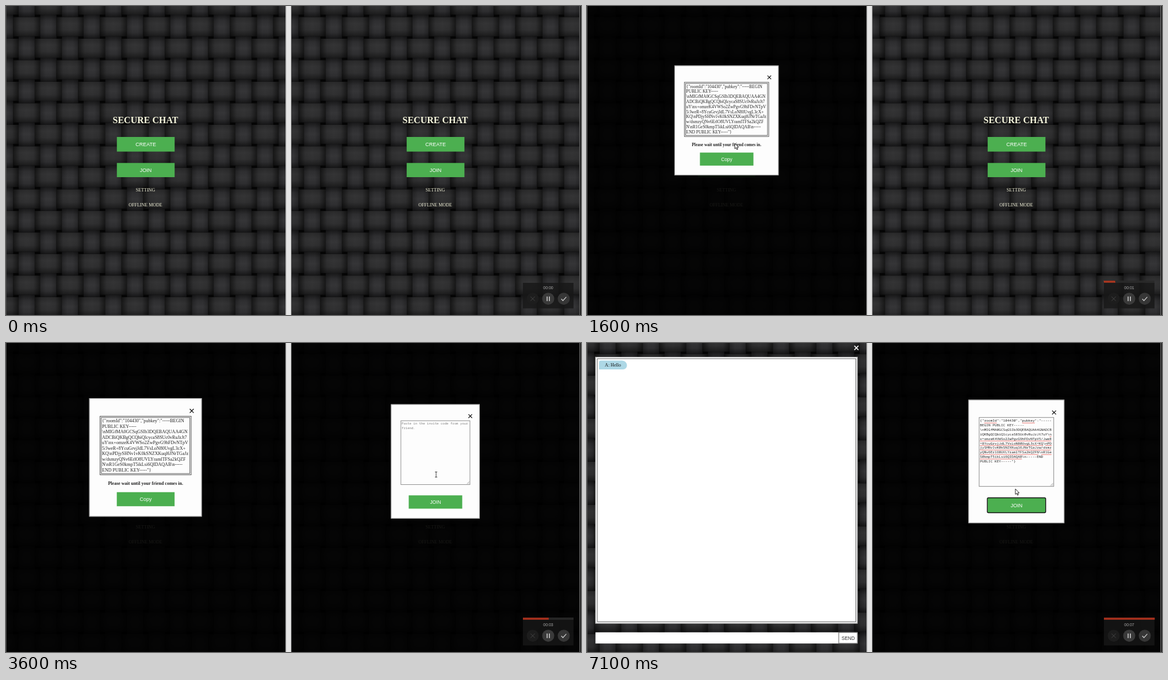
Write an HTML page with a canvas that moves like this. It is 1000x538 px and loops after 7200 ms.

```html
<!DOCTYPE html>
<html lang="en">
<head>
<meta charset="utf-8">
<title>Secure chat</title>
<style>
html, body { margin: 0; height: 100%; overflow: hidden; background: #000; }
canvas { display: block; }
</style>
</head>
<body>
<canvas id="stage" width="1000" height="538"></canvas>
<script>
const g = document.getElementById('stage').getContext('2d');
const LOOP = 7200, STEP = 100, GROW = 600;
const CREATE_AT = 1100, COPY_AT = 2400, JOIN_AT = 3100, PASTE_AT = 4200,
      SUBMIT_AT = 4800, CHAT_AT = 6700, HELLO_AT = 7000;
const SERIF = '"Liberation Serif", serif', SANS = '"Liberation Sans", sans-serif',
      MONO = '"Noto Sans Mono", monospace';
const GREEN = '#4caf50', HOVER = '#72bf75';

const keyWide = String.raw`{"roomId":"104430","pubkey":"-----BEGIN
PUBLIC KEY-----
\nMIGfMA0GCSqGSIb3DQEBAQUAA4GN
ADCBiQKBgQCQbiQlcycaS8SUc0vRuJzJt7
uY\nx+omzeK4VWSo2ZwPgvG9hFDvNTpV
5/JweR+8YcuGrvjJdL7VsLoN80UvgL3cX+
KQ\nPDjySHNv1vK0kSNZXKuql6JNrTGaJz
w/dsmzyQNv6ErlO8UVLYramlTFSa2kQZF
N\nR1GeS0kmpT5ikLsi6QIDAQAB\n-----
END PUBLIC KEY-----"}`.split('\n');
const keyMono = String.raw`{"roomId":"104430","pubkey":"-----
BEGIN PUBLIC KEY-----
\nMIGfMA0GCSqGSIb3DQEBAQUAA4GNADCB
iQKBgQCQbiQlcycaS8SUc0vRuJzJt7uY\n
x+omzeK4VWSo2ZwPgvG9hFDvNTpV5/JweR
+8YcuGrvjJdL7VsLoN80UvgL3cX+KQ\nPD
jySHNv1vK0kSNZXKuql6JNrTGaJzw/dsmz
yQNv6ErlO8UVLYramlTFSa2kQZFN\nR1Ge
S0kmpT5ikLsi6QIDAQAB\n-----END
PUBLIC KEY-----"}`.split('\n');
// misspelling marks: line, first column, last column
const marks = [[0, 2, 8], [0, 20, 26], [3, 33, 34], [4, 0, 34], [5, 0, 30], [5, 31, 34],
               [6, 0, 34], [7, 0, 28], [7, 29, 34], [8, 0, 20]];

// cursor path: time, x, y of the tip
const path = [[100, 960, 520], [800, 257, 239], [1700, 257, 239], [2300, 252, 275], [2500, 252, 275],
              [3000, 743, 282], [3200, 743, 282], [3600, 748, 229], [4300, 748, 229], [4800, 764, 284],
              [5700, 764, 284], [6300, 760, 280], [6500, 760, 280], [7000, 745, 254], [7200, 745, 254]];

const clamp = v => Math.max(0, Math.min(1, v));
const smooth = v => (v = clamp(v), v * v * (3 - 2 * v));

function rect(x, y, w, h, fill) {
  g.fillStyle = fill;
  g.fillRect(x, y, w, h);
}
function frame(x, y, w, h, color, line = 1) {
  g.strokeStyle = color;
  g.lineWidth = line;
  g.strokeRect(x, y, w, h);
}
function text(s, x, y, size, family, color, align = 'center', weight = '') {
  g.font = `${weight} ${size}px ${family}`;
  g.fillStyle = color;
  g.textAlign = align;
  g.fillText(s, x, y);
}
function line(points, color, width) {
  g.beginPath();
  points.forEach(p => g.lineTo(...p));
  g.strokeStyle = color;
  g.lineWidth = width;
  g.stroke();
}
function cross(x, y, r, color, width = 1.3) {
  line([[x - r, y - r], [x + r, y + r]], color, width);
  line([[x - r, y + r], [x + r, y - r]], color, width);
}
function shade(x0, y0, x1, y1, colors) {
  const s = g.createLinearGradient(x0, y0, x1, y1);
  colors.forEach((c, i) => s.addColorStop(i / (colors.length - 1), c));
  return s;
}

function weave(left, width) {
  g.save();
  g.beginPath();
  g.rect(left, 0, width, 538);
  g.clip();
  rect(left, 0, width, 538, '#050505');
  for (let i = -1; i < 15; i++) for (let j = -1; j < 14; j++) {
    const x = left + 36 + 37.7 * j, y = 36 + 37.5 * i;
    if ((i + j) % 2 === 0) {
      rect(x - 24, y - 16.5, 48, 33, shade(x - 24, 0, x + 24, 0, ['#161616', '#303031', '#343435', '#303031', '#161616']));
      rect(x - 24, y - 16.5, 48, 33, shade(0, y - 16.5, 0, y + 16.5, ['#0003', '#0000', '#0001', '#0007']));
    } else {
      rect(x - 14, y - 21, 28, 42, shade(0, y - 21, 0, y + 21, ['#181819', '#2e2e30', '#353537', '#2e2e30', '#151516']));
      rect(x - 14, y - 21, 28, 42, shade(x - 14, 0, x + 14, 0, ['#0004', '#0000', '#0000', '#0004']));
    }
  }
  g.restore();
}

function button(label, x, y, w, h, hover, focus) {
  rect(x, y, w, h, hover ? HOVER : GREEN);
  if (focus) {
    g.beginPath();
    g.roundRect(x - .5, y - .5, w + 1, h + 1, 2);
    g.strokeStyle = '#111';
    g.lineWidth = 1.4;
    g.stroke();
  }
  text(label, x + w / 2, y + h / 2 + 3.2, 9, SANS, '#fff');
}

function home(cx, hover) {
  text('SECURE CHAT', cx, 203.7, 16, SERIF, '#f5f5dc', 'center', 'bold');
  button('CREATE', cx - 49.7, 228, 100.5, 25.5, hover === 'CREATE');
  button('JOIN', cx - 49.7, 273.3, 100.5, 24.7, hover === 'JOIN');
  text('SETTING', cx, 323, 8, SERIF, '#f5f5dc');
  text('OFFLINE MODE', cx, 348.7, 8, SERIF, '#f5f5dc');
}

// dimmed panel with a window growing from its centre
function popup(t, start, left, width, cx, cy, content) {
  const dim = clamp((t - start + 150) / 200);
  if (!dim) return;
  rect(left, 0, width, 538, `rgba(0,0,0,${.9 * dim})`);
  const k = smooth((t - start) / GROW);
  if (!k) return;
  g.save();
  g.translate(cx, cy);
  g.scale(k, k);
  g.translate(-cx, -cy);
  content(t);
  g.restore();
}

function sheet(x, y, w, h, closeX, closeY) {
  rect(x, y, w, h, '#fdfdfd');
  frame(x + .5, y + .5, w - 1, h - 1, '#999');
  cross(closeX, closeY, 3.4, '#111');
}

function invite(t) {
  sheet(144.7, 96, 195.8, 206.3, 323, 118.2);
  frame(163.5, 127.5, 158.5, 102, '#555');
  frame(165.7, 129.7, 154, 97.6, '#555');
  keyWide.forEach((s, i) => text(s, 167, 138 + 9.5 * i, 8.05, SERIF, '#222', 'left'));
  text('Please wait until your friend comes in.', 242.7, 247.2, 8, SERIF, '#222', 'center', 'bold');
  const over = t >= 2200 && t < 2600;
  button('Copy', 192.7, 259.7, 100.5, 24.5, over, t >= COPY_AT && t < 3300);
}

function joinForm(t) {
  sheet(663.3, 98.7, 166.9, 214.9, 812.3, 121);
  frame(682, 129.7, 129.7, 120, '#888');
  line([[806, 248.5], [810.5, 244]], '#777', .7);
  line([[808.5, 248.5], [810.5, 246.5]], '#777', .7);
  const row = (s, i, color) => text(s, 683.3, 137.3 + 7.85 * i, 6.12, MONO, color, 'left');
  if (t < PASTE_AT) {
    ['Paste in the invite code from your', 'friend.'].forEach((s, i) => row(s, i, '#808080'));
  } else {
    keyMono.forEach((s, i) => row(s, i, '#222'));
    for (const [i, a, b] of marks) {
      const wave = [];
      for (let x = a * 3.672, n = 0; x <= b * 3.672; x += 1, n++)
        wave.push([683.3 + x, 138.9 + 7.85 * i + (n % 2) * .7]);
      line(wave, '#e2433c', .8);
    }
  }
  button('JOIN', 696.7, 270, 100.5, 25, t >= 4700 && t < 6700, t >= SUBMIT_AT);
}

function chat(t) {
  cross(468.5, 8.5, 3.6, '#fff', 1.5);
  rect(14.5, 24, 456, 464.5, '#fff');
  frame(15, 24.5, 455, 463.5, '#999');
  frame(18, 27.3, 449.5, 458, '#666');
  if (t >= HELLO_AT) {
    g.beginPath();
    g.roundRect(21, 30.5, 48.5, 15.5, [4, 10, 8, 1]);
    g.fillStyle = '#add8e6';
    g.fill();
    text('A: Hello', 45, 40.5, 8, SERIF, '#111');
  }
  rect(14.7, 503.7, 422.5, 19.5, '#fff');
  rect(437.5, 503.7, 33, 19.5, '#fff');
  frame(438, 504.2, 32, 18.5, '#888');
  text('SEND', 454.3, 516.5, 8.3, SANS, '#333');
}

function recorder(t) {
  rect(899, 482, 88, 44.5, 'rgba(23,23,23,.8)');
  if (t > 0) {
    const w = 12.45 * t / 1000;
    rect(899, 478, 88, 4, 'rgba(42,42,42,.9)');
    rect(899, 478.3, w, 3.5, t < JOIN_AT ? '#7c2a18' : '#a92f1b');
    if (t < JOIN_AT)
      for (let x = 0; x < w - 1; x += 2.2) line([[899 + x, 478.5], [900.4 + x, 481.5]], '#e8492c', 1);
  }
  text('00:0' + Math.floor(t / 1000), 943, 493.4, 7, SANS, '#aaa');
  [[916, '#1d1d1d'], [943, '#3a3a3a'], [970, '#363636']].forEach(([x, c]) => {
    g.beginPath();
    g.arc(x, 509.7, 10.5, 0, 7);
    g.fillStyle = c;
    g.fill();
  });
  cross(916, 509.7, 3.8, '#444', 1);
  rect(940.3, 505.8, 1.6, 8, '#ccc');
  rect(944.2, 505.8, 1.6, 8, '#ccc');
  line([[965.7, 510], [968.6, 513], [974.4, 506.6]], '#ccc', 1.3);
}

const shapes = {
  arrow: 'M0 0V9.5L2.2 7.6L3.7 11L5.3 10.2L3.8 7H6.7Z',
  hand: 'M0 1Q.9-.6 1.8 1V4.6Q3-0 3.5 4.8Q5 4 5.3 5.2Q7.3 4.6 7.3 6.5V9L6.2 12.5H1L-2.3 7.6Q-1.7 6.1 0 7.5Z',
};

function cursor(t) {
  if (t < path[0][0]) return;
  const n = path.findIndex((p, i) => i && t <= p[0]);
  const [t0, x0, y0] = path[n - 1], [t1, x1, y1] = path[n];
  const k = smooth((t - t0) / (t1 - t0));
  const x = x0 + (x1 - x0) * k, y = y0 + (y1 - y0) * k;
  const beam = t >= 3500 && t < 4600;
  const hand = t >= 700 && t < 1000 || t >= 2200 && t < 2600 || t >= 3000 && t < 3200 || t >= 4700 && t < 6700;
  g.save();
  g.translate(x, y);
  if (beam) {
    line([[0, -4.5], [0, 4.5]], '#444', 1);
    line([[-2, -4.5], [2, -4.5]], '#444', 1);
    line([[-2, 4.5], [2, 4.5]], '#444', 1);
  } else {
    const p = new Path2D(hand ? shapes.hand : shapes.arrow);
    g.fillStyle = '#fff';
    g.fill(p);
    g.strokeStyle = '#111';
    g.lineWidth = .9;
    g.stroke(p);
  }
  g.restore();
}

function draw(now) {
  const t = Math.floor(now % LOOP / STEP) * STEP;
  weave(0, 486);
  weave(496.5, 501);
  if (t < CHAT_AT) {
    home(242.5, t >= 700 && t < 1000 && 'CREATE');
    popup(t, CREATE_AT, 0, 486, 242.7, 199.2, invite);
  } else chat(t);
  home(746.5, t >= 2900 && t < 3100 && 'JOIN');
  popup(t, JOIN_AT, 496, 502, 746.7, 206.2, joinForm);
  rect(0, 0, 1, 538, '#444');
  rect(486, 0, 10.3, 538, '#a8a8a8');
  rect(487.5, 0, 8, 538, '#e6e6e6');
  rect(997.3, 0, 1, 538, '#8a8a8a');
  rect(998.3, 0, 1.7, 538, '#222');
  recorder(t);
  cursor(t);
  requestAnimationFrame(draw);
}
requestAnimationFrame(draw);
</script>
</body>
</html>
```
